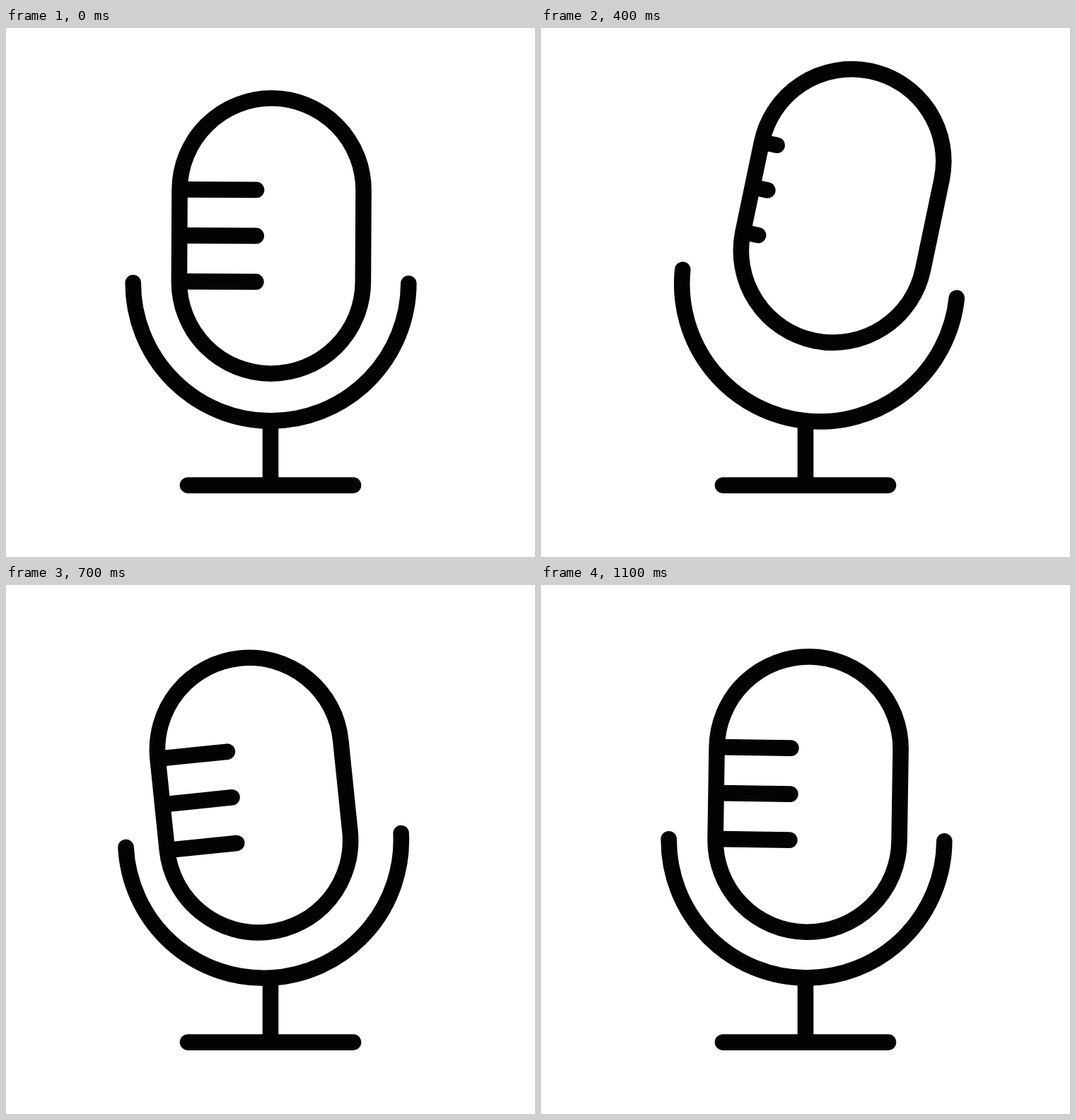
Recreate the animation shown at these times as an HTML page. Size 748 by 748 pixels, loop 1200 ms.

```html
<!DOCTYPE html>
<html lang="en">
<head>
<meta charset="utf-8">
<title>Swinging microphone</title>
<style>
html, body { margin: 0; width: 100%; height: 100%; overflow: hidden; background: #fff; }
svg { display: block; width: 100vw; height: 100vh; }
</style>
</head>
<body>
<svg viewBox="0 0 748 748" fill="none" stroke="#030303" stroke-width="22.6" stroke-linecap="round">
  <defs>
    <rect id="shell" x="-130" y="-394.7" width="260" height="389.4" rx="130"/>
    <clipPath id="inside"><use href="#shell"/></clipPath>
  </defs>
  <path d="M257 646.6H491M374 556V646"/>
  <g id="cradle">
    <path d="M-194.8 -194.9A194.8 194.8 0 0 0 194.8 -194.9"/>
    <g id="capsule">
      <g clip-path="url(#inside)"><path id="bars" d="M-108.5 -265H0M-108.5 -200H0M-108.5 -135H0"/></g>
      <use href="#shell"/>
    </g>
  </g>
</svg>
<script>
const LOOP = 1200, STEP = 100;
const [cradle, capsule, bars] = ["cradle", "capsule", "bars"].map(id => document.getElementById(id));

const place = (el, x, y, angle = 0) =>
  el.setAttribute("transform", `translate(${x} ${y}) rotate(${angle})`);

// smooth rise from 0 to 1 between two times
function ramp(t, from, to) {
  const u = Math.min(1, Math.max(0, (t - from) / (to - from)));
  return u * u * (3 - 2 * u);
}

function draw(t) {
  // swing right, then left, then back upright
  const tilt = 0.15 + 5.75 * ramp(t, 0, 270) - 9.9 * ramp(t, 466, 760) + 4.45 * ramp(t, 800, 900);
  const lift = 47.3 * ramp(t, 0, 200) - 49.3 * ramp(t, 400, 627);
  // bars leave on the right, then glide in again from the left
  const slide = t < 300 ? 1.19 * t - 21.5 : -25 - 83 * Math.exp((400 - t) / 115);

  place(cradle, 374, 555.6, tilt);
  place(capsule, 0, -61.6 - lift, tilt); // leans as far again inside the cradle
  place(bars, slide, 0);
}

const start = performance.now();
function tick() {
  const t = (performance.now() - start) % LOOP;
  draw(Math.floor(t / STEP) * STEP);
  requestAnimationFrame(tick);
}
tick();
</script>
</body>
</html>
```
